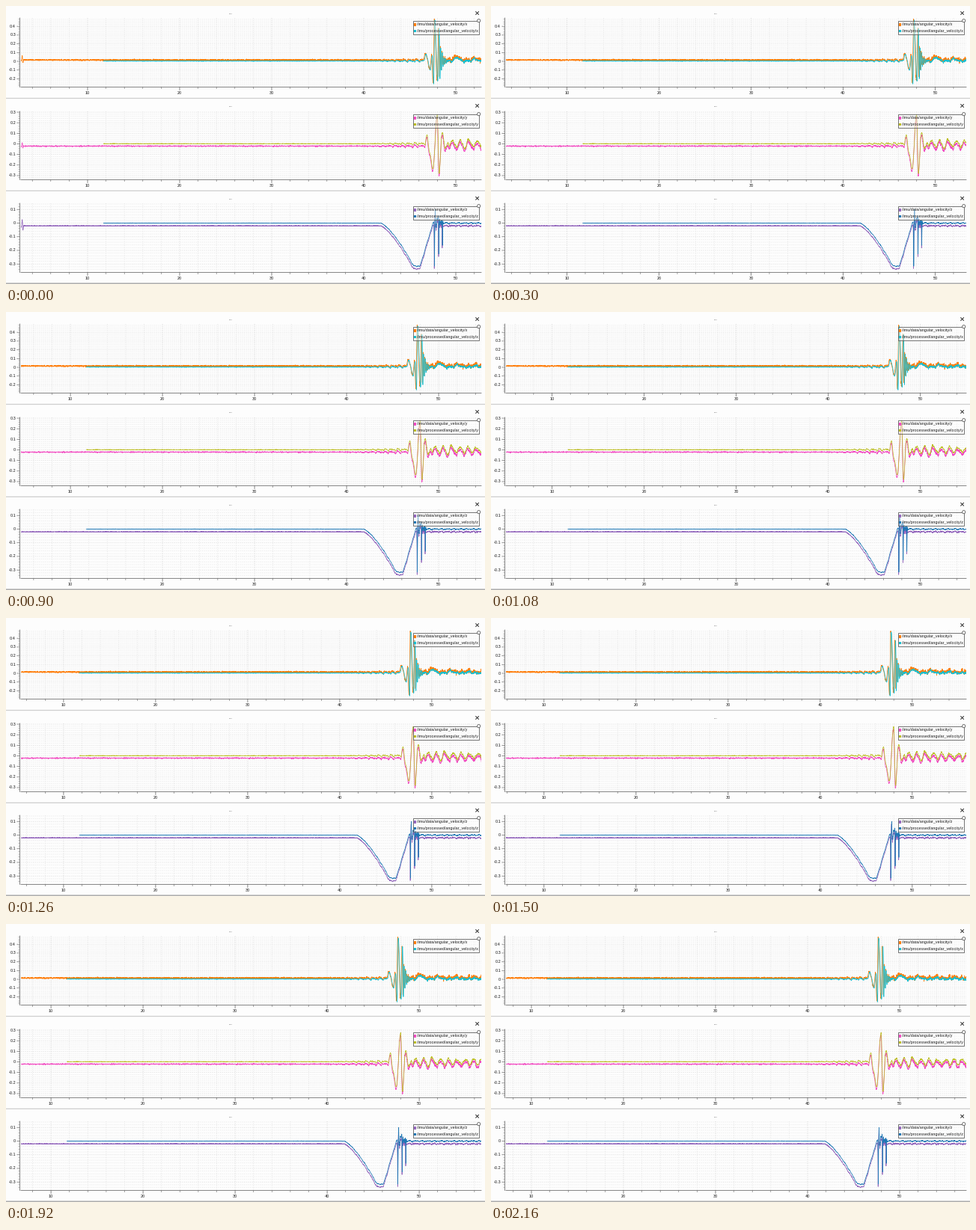
A matplotlib script for the animation above (2.22 s loop, 640x372 px).

```python
import numpy as np
import matplotlib.pyplot as plt
from matplotlib.animation import FuncAnimation
from matplotlib.patches import Circle, Rectangle

W, H, DPI = 640, 372, 100
PT = 72 / DPI                      # points per pixel
FRAMES, INTERVAL = 37, 60
SCALE, STEP = 12.3, 1.528          # px per second of data, px scrolled per frame
LEFT, RIGHT = 20, 635
INK, AXIS = "#1c1c1c", "#6a6a6a"
DOTS = dict(ls=(0, (1.6, 2.2)))

plt.rcParams["font.family"] = "Liberation Sans"
rng = np.random.default_rng(4)
t = np.arange(2.4, 57.6, 0.01)


# ---- signals ----
def swings(points):
    """Cosine interpolation through (time, value) turning points."""
    px, py = np.array(points).T
    k = np.clip(np.searchsorted(px, t) - 1, 0, len(px) - 2)
    u = np.clip((t - px[k]) / (px[k + 1] - px[k]), 0, 1)
    return py[k] + (py[k + 1] - py[k]) * (1 - np.cos(np.pi * u)) / 2


def bump(at, width):
    return np.exp(-((t - at) / width) ** 2)


def ramp(start, length):
    return np.clip((t - start) / length, 0, 1)


def wobble(p):
    return (np.sin(9.1 * t + p) + 0.7 * np.sin(14.3 * t + 2 * p)
            + 0.6 * np.sin(23.7 * t + 3 * p) + 0.4 * np.sin(41 * t + p)) / 2


def pair(move, raw, clean, raw_noise, clean_noise, blip, extra, lag=0):
    """Raw signal over the whole time, filtered one from 11.72 s on."""
    late = ramp(47.5, 0.3)
    noise = rng.normal(size=(2, t.size))
    a = raw + move + blip * start_blip + noise[0] * (raw_noise + extra * late)
    b = clean + np.roll(move, lag) + noise[1] * (clean_noise + extra * 0.5 * late)
    return a, np.where(t >= 11.72, b, np.nan)


active = ramp(40, 5) ** 1.5
start_blip = bump(2.92, 0.1) * np.sin((t - 2.84) * 30)

# roll: a few wide swings, then fast ringing and slow humps
ring = np.exp(-np.abs(t - 48.2) / 0.3) * -np.sin(2 * np.pi * (t - 48.18) / 0.17)
humps = np.maximum(0, np.cos(2 * np.pi * (t - 50.1) / 1.95)) * np.exp(-ramp(50, 7) * 2)
move_x = swings([(46.45, 0), (46.72, .08), (47.17, -.11), (47.38, .07), (47.53, -.265),
                 (47.66, .465), (47.98, -.24), (48.13, .38), (48.22, 0)])
move_x += 0.2 * ring * (t > 48.18) + 0.04 * humps * ramp(49.3, 0.5)
move_x += 0.013 * active * wobble(0.4)

# pitch: one large swing, then a steady ripple
move_y = swings([(46.6, 0), (46.85, .075), (47.1, -.07), (47.5, -.235), (47.97, .285),
                 (48.17, -.285), (48.5, .11), (48.85, -.04), (49.15, 0)])
ripple = (0.024 + 0.03 * bump(51.15, 0.5)) * np.cos(2 * np.pi * (t - 51.4) / 0.9)
move_y += ripple * ramp(49.1, 0.3) + 0.014 * active * wobble(1.7)

# yaw: accelerating fall, flat bottom, straight rise, then shocks
fall, rise = ramp(41.8, 3.6) ** 1.4, 1 - ramp(46.1, 1.4)
burst = ramp(47.55, 0.05) * np.exp(-ramp(47.7, 4) * 7) * (t < 48.6)
jolts = np.repeat(rng.uniform(-.04, .1, t.size // 4 + 1), 4)[:t.size]
move_z = -0.315 * np.minimum(fall, rise) + 0.005 * active * wobble(2.6) + burst * jolts
for at, size in [(47.66, -.36), (47.75, .07), (48.13, -.24), (48.53, -.16)]:
    move_z += size * bump(at, 0.02)

# ---- stage ----
fig = plt.figure(figsize=(W / DPI, H / DPI), dpi=DPI, facecolor="#fdfdfd")
ax = fig.add_axes([0, 0, 1, 1])
ax.set_xlim(0, W)
ax.set_ylim(H, 0)
ax.axis("off")


def stroke(xs, ys, color, width, z=1, **kw):
    line, = ax.plot(xs, ys, color=color, lw=width * PT, zorder=z, **kw)
    line.set_snap(False)
    return line


def label(x, y, s, size=5.5, **kw):
    return ax.text(x, y, s, fontsize=size * PT, color=INK, zorder=6,
                   va=kw.pop("va", "center"), **kw)


def uprights(xs, y0, y1):
    """Vertical segments as one broken polyline."""
    return np.repeat(xs, 3), np.tile([y0, y1, np.nan], len(xs))


class Panel:
    def __init__(self, top, base, head, zero, unit, axis, colors, signals):
        self.top, self.base, self.zero, self.unit = top, base, zero, unit
        self.draw_y_axis()
        self.minor_grid = stroke([], [], "#e2e2e2", 0.7, **DOTS)
        self.major_grid = stroke([], [], "#d2d2d2", 0.7, **DOTS)
        self.minor_ticks = stroke([], [], AXIS, 0.6)
        self.major_ticks = stroke([], [], AXIS, 0.8)
        stroke([LEFT, RIGHT], [base, base], AXIS, 0.8)
        self.names = [label(0, base + 7.8, str(v), ha="center") for v in range(10, 60, 10)]

        clip = Rectangle((LEFT, top), RIGHT - LEFT, base - top - 1, transform=ax.transData)
        self.curves = []
        for color, signal in zip(colors, signals):
            line = stroke([], [], color, 0.75, z=3)
            line.set_clip_path(clip)
            self.curves.append((line, zero - signal * unit))
        self.draw_head(head)
        self.draw_legend(axis, colors)

    def draw_y_axis(self):
        step = self.unit / 50
        lo = int(np.ceil((self.zero - self.base + 1) / step))
        hi = int(np.floor((self.zero - self.top) / step))
        for k in range(lo, hi + 1):
            y, major = self.zero - k * step, k % 5 == 0
            stroke([LEFT, RIGHT], [y, y], "#d6d6d6" if major else "#e4e4e4", 0.7, **DOTS)
            stroke([14.8 if major else 16.6, 18.5], [y, y], AXIS, 0.7 if major else 0.4)
            if major:
                label(13, y, f"{k / 50:g}", ha="right")
        stroke([18.5, 18.5], [self.top, self.base], AXIS, 0.8)

    def draw_head(self, y):
        label(299.5, y + 1.5, "...", size=6, ha="center", va="baseline")
        for s in (-1, 1):
            stroke([627.7, 631.5], [y - 1.9 * s, y + 1.9 * s], INK, 0.9, z=6)

    def draw_legend(self, axis, colors):
        y = self.top + 4.3
        ax.add_patch(Rectangle((543.5, y), 88, 17.5, fc=(1, 1, 1, 0.4), ec="#555555",
                               lw=0.8 * PT, zorder=4))
        for row, (kind, color) in enumerate(zip(("data", "processed"), colors)):
            cy = y + 4.6 + 8.7 * row
            ax.add_patch(Rectangle((545, cy - 1.7), 3.4, 3.4, fc=color, lw=0, zorder=5))
            label(549.2, cy, f"/imu/{kind}/angular_velocity/{axis}", size=5.35)
        ax.add_patch(Circle((631.7, self.top + 3.7), 2.1, fc="white", ec="#444444",
                            lw=0.7 * PT, zorder=6))

    def scroll(self, ten):
        every = np.arange(0, 60, 2)
        major = every % 10 == 0
        for values, grid, ticks, size in (
                (every[~major], self.minor_grid, self.minor_ticks, 2.2),
                (every[major], self.major_grid, self.major_ticks, 4)):
            xs = ten + (values - 10) * SCALE
            xs = xs[(xs >= LEFT) & (xs <= RIGHT)]
            grid.set_data(*uprights(xs, self.top, self.base))
            ticks.set_data(*uprights(xs, self.base, self.base + size))
        for k, name in enumerate(self.names):
            name.set_x(ten + 10 * k * SCALE)
        for line, ys in self.curves:
            line.set_data(ten + (t - 10) * SCALE, ys)


panels = [
    Panel(16, 108.5, 9.5, 74, 117, "x", ("#ff7f0e", "#17becf"),
          pair(move_x, .015, .003, .004, .0015, .05, .007, lag=6)),
    Panel(141, 232.5, 133.5, 184.5, 141.5, "y", ("#f14cc1", "#bcbd22"),
          pair(move_y, -.021, .002, .0025, .0008, .03, .003, lag=2)),
    Panel(264, 356.5, 257.3, 290.5, 182.5, "z", ("#9467bd", "#1f77b4"),
          pair(move_z, -.02, 0, .0012, .0007, .05, .001, lag=2)),
]
for y, color in ((123.5, "#cfcfcf"), (247.3, "#cfcfcf"), (371.2, "#a0a0a0")):
    stroke([0, W], [y, y], color, 1.3)


def draw(i):
    for p in panels:
        p.scroll(109 - STEP * i)
    return []


anim = FuncAnimation(fig, draw, frames=FRAMES, interval=INTERVAL, repeat=True,
                     repeat_delay=0, blit=False)
plt.show()
```
